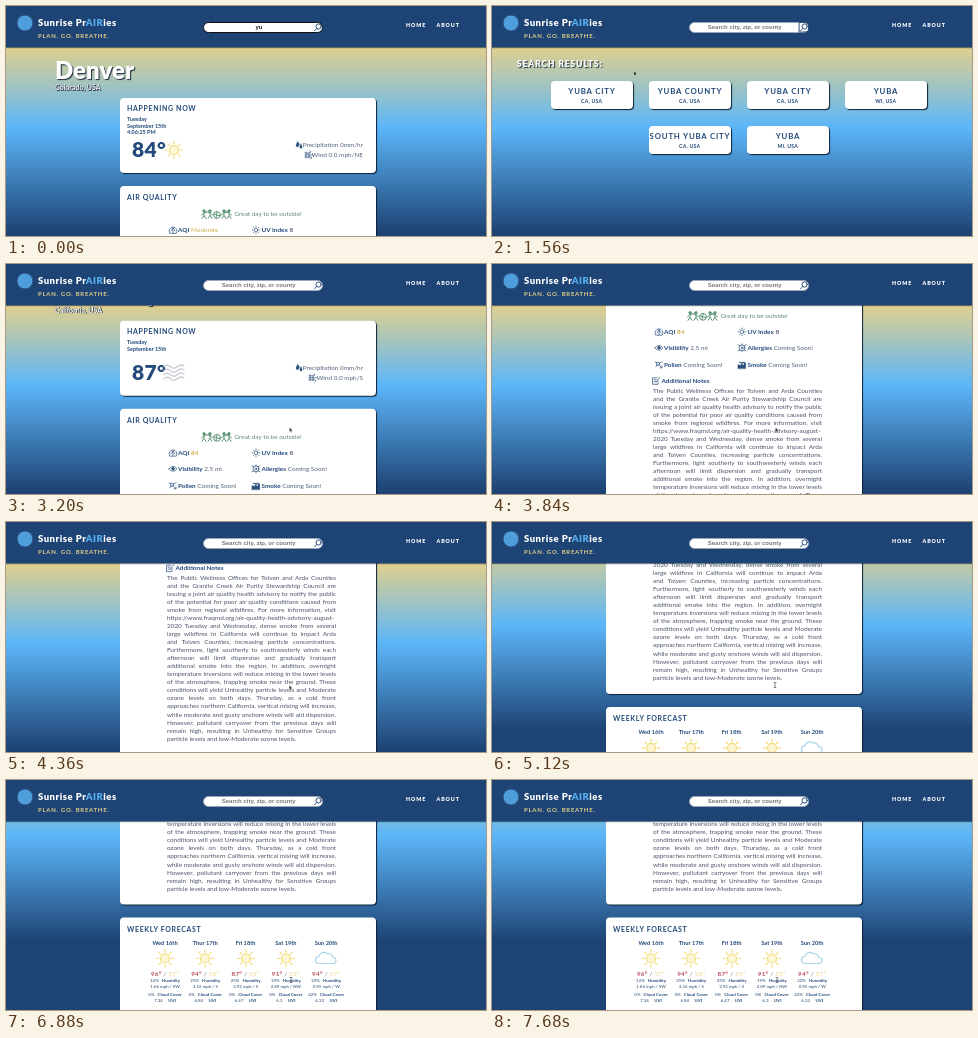
Recreate the animation shown at these times as an HTML page. Size 480x230 px, loop 7720 ms.

```html
<!DOCTYPE html>
<html lang="en">
<head>
<meta charset="utf-8">
<title>Air quality search</title>
<style>
  html, body { margin: 0; width: 100%; height: 100%; overflow: hidden; background: #1e4475; }
  #stage { position: relative; width: 480px; height: 230px; overflow: hidden; background: #1e4475; color: #234a7a; font-family: Lato, "Open Sans", sans-serif; }
  #stage, #stage * { box-sizing: border-box; }
  .loop { animation: 7720ms step-end infinite; }
  .layer, .t, .card, svg, #sky, header, #field { position: absolute; }
  .layer { inset: 0; }
  .t { line-height: 0; white-space: nowrap; font-size: 6.4px; }
  .mid { transform: translateX(-50%); }

  #sky { left: 0; top: 0; width: 480px; height: 230px; background: linear-gradient(#e2d08c 40px, #5cb6f9 121px, #1e4475 226px); animation: sky 7720ms linear infinite; }
  header { inset: 0 0 auto; height: 41px; background: #1e4475; box-shadow: 0 1px 1px #0d254599; }
  .brand { font-size: 9.5px; font-weight: 900; letter-spacing: .5px; color: #fff; }
  .brand b { color: #58b2f2; font-weight: 900; }
  .slogan { font-size: 6px; font-weight: 700; letter-spacing: .72px; color: #e3cf87; }
  .nav { font-size: 5.3px; font-weight: 900; letter-spacing: .9px; color: #fff; }
  #field { left: 197px; top: 16px; width: 120px; height: 11px; border: 1px solid #9aa7b8; border-radius: 6px; background: #fff; }
  .query { font: bold 6px/0 "Liberation Sans", Arial, sans-serif; color: #777; }
  .typed { color: #222; }

  .city { font-size: 24px; font-weight: 900; color: #fff; text-shadow: 1px 1px 1px #1c2b40; }
  .region { font-size: 7px; font-weight: 700; color: #fff; text-shadow: .7px .7px .6px #1c2b40, 0 0 1px #1c2b40; }
  .found { font-size: 8.3px; font-weight: 900; letter-spacing: 1px; color: #fff; text-shadow: 1px 1px 1px #1c2b40; }
  .card { left: 114px; width: 256px; background: #fff; border-radius: 4px; box-shadow: 1px 1px 1px #0d2038; }
  .head { font-size: 7px; font-weight: 700; letter-spacing: .65px; }
  .small { font-size: 5.5px; font-weight: 700; }
  .temp { font-size: 21px; font-weight: 900; letter-spacing: .3px; }
  .grey { color: #52627a; }
  .gold { color: #cfae4e; }
  .green { color: #5c8a70; }
  .place { font-size: 7.8px; font-weight: 700; letter-spacing: .8px; }
  .state { font-size: 5.2px; font-weight: 700; letter-spacing: .2px; }
  .note { width: 169px; font-size: 6.4px; color: #4a5568; text-align-last: justify; }
  .note.end { text-align-last: left; }
  .day { font-size: 5.7px; font-weight: 700; }
  .range { font-size: 6.3px; letter-spacing: .25px; color: #777; }
  .range b { color: #b8475a; }
  .range i { color: #e9d88c; font-style: normal; }
  .fact { font-size: 4.4px; }
  .fact b { margin-left: 2px; }

  svg { overflow: visible; fill: none; stroke: #2b4f7d; stroke-linecap: round; stroke-linejoin: round; }

  #denver { animation-name: first; }
  #results, #focus { animation-name: second; }
  #yuba { animation-name: third; }
  #hint { animation-name: later; }
  #field { animation-name: edge; }
  #q1 { animation-name: typed1; }
  #q2 { animation-name: typed2; }
  #q3 { animation-name: typed3; }
  #page { animation: scroll 7720ms linear infinite; }
  #mouse { left: 0; top: 0; animation: path 7720ms linear infinite; }
  #arrow { animation-name: arrow; }
  #beam { animation-name: beam; }

  @keyframes first { 0% { visibility: visible } 8.29%, 100% { visibility: hidden } }
  @keyframes second { 0% { visibility: hidden } 8.29% { visibility: visible } 25.91%, 100% { visibility: hidden } }
  @keyframes third { 0% { visibility: hidden } 25.91%, 100% { visibility: visible } }
  @keyframes later { 0% { visibility: hidden } 8.29%, 100% { visibility: visible } }
  @keyframes edge { 0% { border-color: #111 } 8.29%, 100% { border-color: #9aa7b8 } }
  @keyframes typed1 { 0% { visibility: visible } 1.04%, 100% { visibility: hidden } }
  @keyframes typed2 { 0% { visibility: hidden } 1.04% { visibility: visible } 2.59%, 100% { visibility: hidden } }
  @keyframes typed3 { 0% { visibility: hidden } 2.59% { visibility: visible } 8.29%, 100% { visibility: hidden } }
  @keyframes scroll {
    0%, 38.34% { transform: translateY(0) }
    41.45% { transform: translateY(-35px) }
    49.74% { transform: translateY(-156px) }
    52.33% { transform: translateY(-190px) }
    61.14% { transform: translateY(-268px) }
    63.21% { transform: translateY(-270px) }
    66.32% { transform: translateY(-288px) }
    72.02% { transform: translateY(-315px) }
    74.09% { transform: translateY(-318px) }
    77.2%, 100% { transform: translateY(-335.5px) }
  }
  /* the sky only moves once the page is near its end */
  @keyframes sky {
    0%, 63.21% { transform: translateY(0) }
    66.32% { transform: translateY(-18px) }
    72.02% { transform: translateY(-45px) }
    74.09% { transform: translateY(-48px) }
    77.2%, 100% { transform: translateY(-65.5px) }
  }
  @keyframes path {
    0%, 3.89% { transform: translate(290px, 40px) }
    7.25%, 8.8% { transform: translate(312px, 22px) }
    20.21% { transform: translate(142px, 65px) }
    22.8%, 26.5% { transform: translate(105px, 87px) }
    33.68%, 49.74% { transform: translate(283.5px, 163.5px) }
    63.21%, 72.02% { transform: translate(283px, 163px) }
    79.27% { transform: translate(296px, 188px) }
    84.2%, 100% { transform: translate(285px, 200px) }
  }
  @keyframes arrow {
    0% { visibility: hidden } 3.89% { visibility: visible }
    63.21% { visibility: hidden } 72.02% { visibility: visible }
    82.9%, 100% { visibility: hidden }
  }
  @keyframes beam {
    0% { visibility: hidden } 63.21% { visibility: visible }
    72.02% { visibility: hidden } 82.9%, 100% { visibility: visible }
  }
</style>
</head>
<body>
<div id="stage"></div>
<script>
const text = (x, y, cls, html) => `<div class="t ${cls}" style="left:${x}px;top:${y}px">${html}</div>`;
const mid = (x, y, cls, html) => text(x, y, `mid ${cls}`, html);
const right = (x, y, cls, html) => `<div class="t ${cls}" style="right:${480 - x}px;top:${y}px">${html}</div>`;
const card = (y, h, x = 114, w = 256) => `<div class="card" style="left:${x}px;top:${y}px;width:${w}px;height:${h}px"></div>`;

// Icons are drawn around their own centre.
const rays = Array.from({ length: 8 }, (_, i) => `<path d="M0-6.2V-8.6" transform="rotate(${i * 45})"/>`).join('');
const person = (x, s) => `<g transform="translate(${x} 0) scale(${s} 1)"><circle cy="-3" r="1.2" fill="#5f9676"/><path d="M0-1.5V1.5L-2 4.5M0 1.5 2 4.5M-2.5 1 0-1 3-2"/></g>`;
const icons = {
  sun: `<g stroke="#f2dc78" stroke-width="1.2"><circle r="4.5" fill="#fdf6d5"/>${rays}</g>`,
  cloud: '<path stroke="#a9d3ea" stroke-width="1.2" d="M-7 5A3.5 3.5 0 0 1-7-2A5 5 0 0 1 1-5A6 6 0 0 1 7-1A3 3 0 0 1 7 5Z"/>',
  haze: [-6, -2, 2, 6].map(y => `<path stroke="#c9cdd3" stroke-width="1.3" d="M-10 ${y}q3.3-3 6.6 0t6.6 0t6.6-1"/>`).join(''),
  people: `<g stroke="#5f9676" stroke-width="1">${person(-12, 1)}${person(-6, -1)}<circle cx="1" cy="1" r="3.4"/><path d="M-2 0 4 2M1-2 0 4"/>${person(8, 1)}${person(13, -1)}</g>`,
  drop: '<path fill="#2b4f7d" stroke-width=".4" d="M-1.3-3.2Q-4.6 1.6-1.3 2Q2-.1-1.3-3.2ZM2-1Q-.3 3 2 3.4Q4.2 3 2-1Z"/>',
  wind: '<path d="M-4-2H1q2-2 0-2M-4 0H4M-4 2H2q2 1 0 2M-3-3V3M0-2V3"/>',
  aqi: '<path d="M-3.5 3A4 4 0 1 1 3.5 3ZM-2 1 0-2 2 1M0-2V3"/>',
  uv: '<circle r="1.8"/><path d="M0-3.8V-3M0 3V3.8M-3.8 0H-3M3 0H3.8M-2.7-2.7-2.2-2.2M2.2 2.2 2.7 2.7M2.7-2.7 2.2-2.2M-2.7 2.7-2.2 2.2"/>',
  eye: '<path d="M-4 0Q0-5 4 0Q0 5-4 0Z"/><circle r="1.3" fill="#2b4f7d"/>',
  allergy: '<circle r="3"/><circle r="1"/><path d="M-4-3-2-2M4-3 2-2M-4 3-2 2M4 3 2 2M0-4V-3M0 3V4"/>',
  pollen: '<circle cx="-1" cy="-1" r="1.6"/><path d="M-4-3-2-2M-3 2-2 0M0 0 3 3M1-2 3-3M1 3H3V1"/>',
  smoke: '<path fill="#2b4f7d" d="M-4 3.5V0L-1 1V-1L2 1V-2H3.5V3.5ZM-3-2q1-2 2 0t3-1"/>',
  note: '<path d="M2 0V3.5H-3.5V-3H1M-2-1H0M-2 1H0M0 1 4-3.5"/>',
};
const icon = (name, x, y, w = .8) => `<svg style="left:${x}px;top:${y}px" width="1" height="1" stroke-width="${w}">${icons[name]}</svg>`;

const notes = `The Public Wellness Offices for Tolven and Arda Counties
and the Granite Creek Air Purity Stewardship Council are
issuing a joint air quality health advisory to notify the public
of the potential for poor air quality conditions caused from
smoke from regional wildfires. For more information, visit
https://www.fraqmd.org/air-quality-health-advisory-august-
2020 Tuesday and Wednesday, dense smoke from several
large wildfires in California will continue to impact Arda
and Tolven Counties, increasing particle concentrations.
Furthermore, light southerly to southwesterly winds each
afternoon will limit dispersion and gradually transport
additional smoke into the region. In addition, overnight
temperature inversions will reduce mixing in the lower levels
of the atmosphere, trapping smoke near the ground. These
conditions will yield Unhealthy particle levels and Moderate
ozone levels on both days. Thursday, as a cold front
approaches northern California, vertical mixing will increase,
while moderate and gusty onshore winds will aid dispersion.
However, pollutant carryover from the previous days will
remain high, resulting in Unhealthy for Sensitive Groups
particle levels and low-Moderate ozone levels.`.split('\n');

const days = [
  ['Wed 16th', 'sun', 96, 57, 14, '1.66 mph / SW', 0, 7.34],
  ['Thur 17th', 'sun', 94, 58, 25, '3.16 mph / S', 0, 6.84],
  ['Fri 18th', 'sun', 87, 59, 25, '2.92 mph / S', 0, 6.47],
  ['Sat 19th', 'sun', 91, 55, 19, '2.89 mph / NW', 0, 6.3],
  ['Sun 20th', 'cloud', 94, 57, 22, '0.95 mph / W', 42, 6.33],
];

const forecast = ([name, sky, high, low, humid, wind, cover, uvi], i) => {
  const x = 159 + i * 40.3;
  return mid(x, 497.5, 'day', name) + icon(sky, x, 513.5)
    + mid(x, 529, 'range', `<b>${high}°</b> / <i>${low}°</i>`)
    + mid(x, 536, 'fact', `${humid}% <b>Humidity</b>`)
    + mid(x, 542, 'fact', wind)
    + mid(x, 549.5, 'fact', `${cover}% <b>Cloud Cover</b>`)
    + mid(x, 555.5, 'fact', `${uvi} &nbsp; <b>UVI</b>`);
};

const measure = (name, x, y, label, value) =>
  icon(name, x, y, .7) + text(x + 5.5, y, 'grey', `<b style="color:#234a7a">${label}</b> ${value}`);

const weather = p => text(49, 64, 'city', p.city) + text(49, 81, 'region', p.region)
  + card(92, 75) + text(121, 102, 'head', 'HAPPENING NOW')
  + text(121, 113, 'small', 'Tuesday') + text(121, 119.5, 'small', 'September 15th') + text(121, 126, 'small', p.clock)
  + text(126, 143, 'temp', p.temp + '°') + icon(p.sky, 168, 144)
  + icon('drop', 293, 139) + right(357, 139, 'grey', 'Precipitation 0mm/hr')
  + icon('wind', p.windX, 149, .7) + right(357, 149, 'grey', 'Wind 0.0 mph/' + p.wind)
  + card(180, 280) + text(121, 190.5, 'head', 'AIR QUALITY')
  + icon('people', 210, 208) + text(228.5, 208, 'green', 'Great day to be outside!')
  + measure('aqi', 166.5, 223.5, 'AQI', `<span class="gold">${p.aqi}</span>`)
  + measure('uv', 250, 223.5, 'UV Index', '<b>8</b>')
  + measure('eye', 166.5, 240, 'Visibility', '2.5 mi')
  + measure('allergy', 250, 240, 'Allergies', 'Coming Soon!')
  + measure('pollen', 166.5, 256.5, 'Pollen', 'Coming Soon!')
  + measure('smoke', 250, 256.5, 'Smoke', 'Coming Soon!')
  + measure('note', 164, 273, 'Additional Notes', '')
  + notes.map((line, i) => text(161, 283 + i * 8.03, i < 20 ? 'note' : 'note end', line)).join('')
  + card(473, 110) + text(121, 483.7, 'head', 'WEEKLY FORECAST')
  + days.map(forecast).join('');

const found = ([x, y, place, state]) => card(y, 28, x, 81.5)
  + mid(x + 41, y + 10.3, 'place', place) + mid(x + 40.7, y + 20, 'state', state + ', USA');

const results = [
  [59, 75, 'YUBA CITY', 'CA'], [157, 75, 'YUBA COUNTY', 'CA'], [255, 75, 'YUBA CITY', 'CA'],
  [353, 75, 'YUBA', 'WI'], [157, 120, 'SOUTH YUBA CITY', 'CA'], [255, 120, 'YUBA', 'MI'],
];

const query = (id, word) => `<div class="loop layer" id="${id}">${mid(253, 21.3, 'query typed', word)}</div>`;

document.getElementById('stage').innerHTML = `
  <div id="sky"></div>
  <div class="loop layer" id="denver">${weather({ city: 'Denver', region: 'Colorado, USA', clock: '4:06:25 PM', temp: 84, sky: 'sun', wind: 'NE', windX: 303, aqi: 'Moderate' })}</div>
  <div class="loop layer" id="results">${text(25, 58, 'found', 'SEARCH RESULTS:')}${results.map(found).join('')}</div>
  <div class="loop layer" id="yuba"><div class="layer" id="page">${weather({ city: 'Yuba City', region: 'California, USA', clock: '', temp: 87, sky: 'haze', wind: 'S', windX: 307, aqi: '<b>84</b>' })}</div></div>
  <header>
    <svg width="40" height="40" stroke="none"><circle cx="19" cy="17" r="8" fill="#4d9edb"/></svg>
    ${text(32, 17, 'brand', 'Sunrise Pr<b>AIR</b>ies')}
    ${text(32, 29.5, 'slogan', 'PLAN. GO. BREATHE.')}
    ${text(400, 19, 'nav', 'HOME')}${text(430.5, 19, 'nav', 'ABOUT')}
    <div class="loop" id="field"></div>
    <svg width="480" height="41" stroke="#222" stroke-width="1"><circle cx="312.6" cy="20.5" r="2.6"/><path d="M310.6 22.6 308.6 24.8"/></svg>
    <svg class="loop" id="focus" width="480" height="41" stroke="#1c3d66"><rect x="307.5" y="16.5" width="9" height="9.5"/></svg>
    ${query('q1', 'yu')}${query('q2', 'yub')}${query('q3', 'yuba')}
    <div class="loop layer" id="hint">${mid(252.7, 21.3, 'query', 'Search city, zip, or county')}</div>
  </header>
  <svg id="mouse" width="1" height="1">
    <path class="loop" id="arrow" fill="#000" stroke="#fff" stroke-width=".4" d="M0 0V4.4L1 3.5 1.7 5 2.4 4.7 1.8 3.2H3.1Z"/>
    <path class="loop" id="beam" stroke="#333" stroke-width=".6" d="M-1-2.7Q0-2.7 0-2Q0-2.7 1-2.7M0-2V2M-1 2.7Q0 2.7 0 2Q0 2.7 1 2.7"/>
  </svg>`;
</script>
</body>
</html>
```
